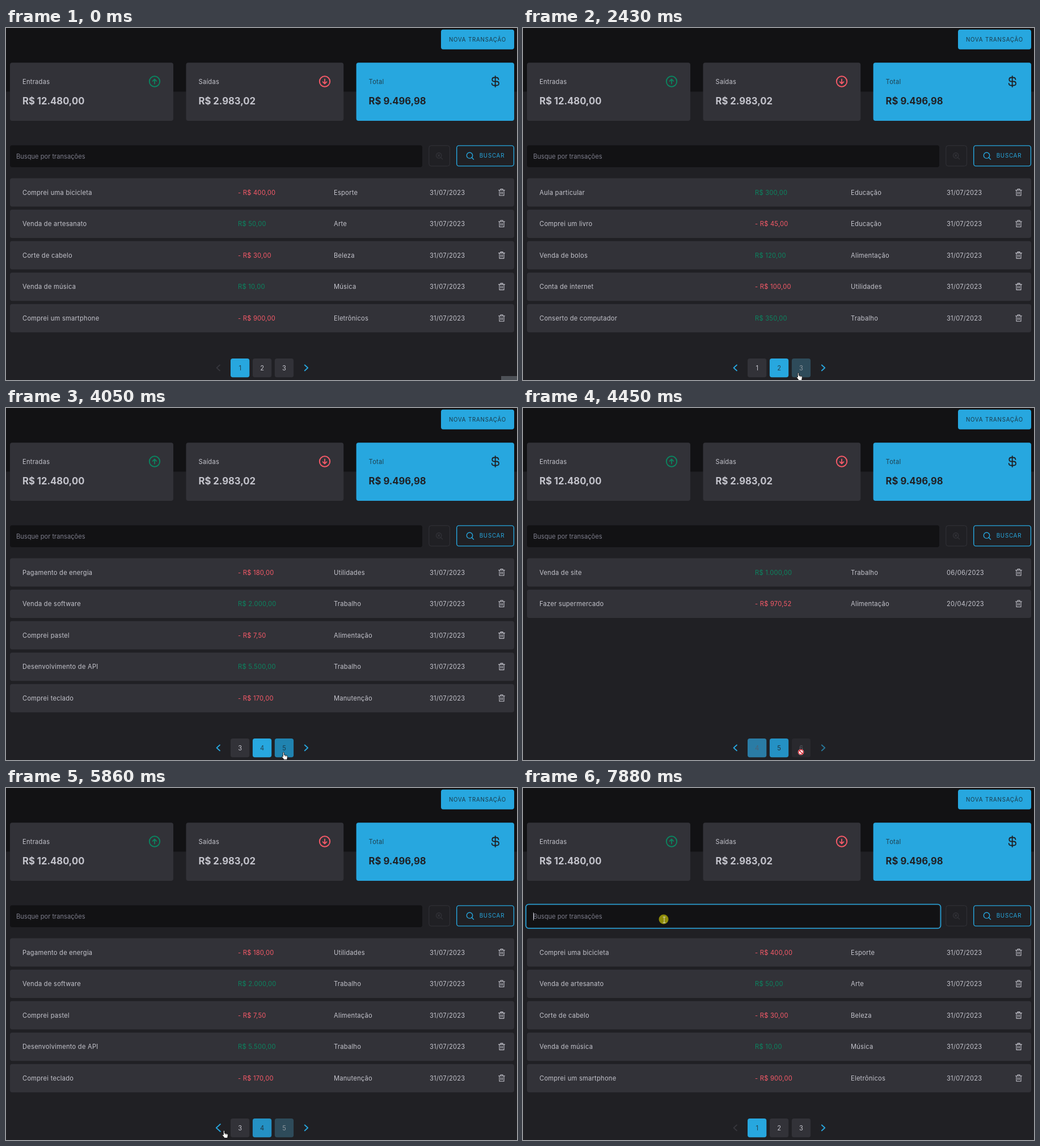
An HTML page for the animation above (8000 ms loop, 901x622 px).

```html
<!DOCTYPE html>
<html lang="pt-BR">
<head>
<meta charset="utf-8">
<title>Transações</title>
<style>
html, body { margin: 0; width: 100%; height: 100%; overflow: hidden; background: #202024; }
svg { display: block; }
text { font: 11.11px Inter, sans-serif; letter-spacing: .26px; fill: #c4c4cc; white-space: pre; }
.sum { font-size: 16.67px; font-weight: 700; letter-spacing: 0; }
.caps { font-size: 9.72px; letter-spacing: .8px; }
.line { fill: none; stroke-linecap: round; stroke-linejoin: round; }
</style>
</head>
<body>
<svg width="901" height="622" viewBox="0 0 901 622">
  <g id="base"></g>
  <g id="live"></g>
</svg>
<script>
const BLUE = '#27a7df', CARD = '#323238', DARK = '#121214', BODY = '#202024';
const GREEN = '#0b8560', RED = '#f75a68', OFF = '#36363c';

const box = (x, y, w, h, fill, r = 4, extra = '') =>
  `<rect x="${x}" y="${y}" width="${w}" height="${h}" rx="${r}" fill="${fill}" ${extra}/>`;
const text = (x, y, s, fill = '#c4c4cc', extra = '') =>
  `<text x="${x}" y="${y}" style="fill:${fill}" ${extra}>${s}</text>`;
const line = (d, color, w = 1.5) =>
  `<path class="line" d="${d}" stroke="${color}" stroke-width="${w}"/>`;
const ring = (x, y, r, color, w) =>
  `<circle cx="${x}" cy="${y}" r="${r}" fill="none" stroke="${color}" stroke-width="${w}"/>`;

// Description | amount | category | date (when it differs)
const pages = [
  ['Comprei uma bicicleta|- R$ 400,00|Esporte', 'Venda de artesanato|R$ 50,00|Arte',
   'Corte de cabelo|- R$ 30,00|Beleza', 'Venda de música|R$ 10,00|Música',
   'Comprei um smartphone|- R$ 900,00|Eletrônicos'],
  ['Aula particular|R$ 300,00|Educação', 'Comprei um livro|- R$ 45,00|Educação',
   'Venda de bolos|R$ 120,00|Alimentação', 'Conta de internet|- R$ 100,00|Utilidades',
   'Conserto de computador|R$ 350,00|Trabalho'],
  ['Concerto de violão|- R$ 60,00|Manutenção', 'Venda de e-book|R$ 150,00|Trabalho',
   'Assinatura de serviço online|- R$ 20,00|Entretenimento',
   'Jantar em restaurante|- R$ 100,00|Alimentação', 'Consultoria|R$ 3.000,00|Trabalho'],
  ['Pagamento de energia|- R$ 180,00|Utilidades', 'Venda de software|R$ 2.000,00|Trabalho',
   'Comprei pastel|- R$ 7,50|Alimentação', 'Desenvolvimento de API|R$ 5.500,00|Trabalho',
   'Comprei teclado|- R$ 170,00|Manutenção'],
  ['Venda de site|R$ 1.000,00|Trabalho|06/06/2023',
   'Fazer supermercado|- R$ 970,52|Alimentação|20/04/2023']
];

// Button looks: background, label
const looks = {
  n: [CARD, '#c4c4cc'],        // normal
  a: [BLUE, '#24414f'],        // active
  h: ['#2083b0', '#183d50'],   // hovered
  o: ['#2a7ca5', '#4d6377'],   // leaving active
  s: ['#2491c4', '#20323d'],   // becoming active
  w: ['#2e4b5a', '#8f979e'],   // half hovered
  x: ['#29292e', '#57575f']    // disabled
};

// time, page, looks of the three buttons, cursor, x, y, click
const steps = `0 1 ann tip 0 0
180 1 ann arrow 884 596
390 1 ann arrow 760 470
600 1 ann arrow 612 346
810 1 ann arrow 548 404
1010 1 ann arrow 486 500
1220 1 ann arrow 462 570
1410 1 awn hand 459 606
1610 1 ahn hand 459 612
2010 1 ahn hand 459 612 click
2210 2 osn hand 459 612
2410 2 naw hand 484 609
2620 2 nah hand 488 608
2820 2 nah hand 488 608 click
3020 3 osw hand 488 608
3230 3 nah hand 488 608
3640 3 nah hand 488 608 click
3840 4 osw hand 488 608
4040 4 nah hand 488 608
4250 4 nah hand 488 608 click
4450 5 osx no 490 608
4650 5 nax no 490 608
4850 5 nax no 488 608
5050 5 nax arrow 470 619
5260 5 nax arrow 420 619
5460 5 nax hand 383 605
5660 5 nax hand 383 605 click
5860 4 nsw hand 383 605
6060 4 nan hand 383 605 click
6260 3 nsw hand 383 605 click
6470 2 nsw hand 383 605 click
6670 1 wsn no 383 604
6870 1 ann no 383 604
7070 1 ann no 383 604
7290 1 ann arrow 352 540
7490 1 ann arrow 276 320
7690 1 ann beam 249 233
7880 1 ann beam 249 233 click`.split('\n').map(s => {
  const [t, page, btns, cursor, x, y, click] = s.split(' ');
  return { t: +t, page: +page, btns, cursor, x: +x, y: +y, click };
});

const cursors = {
  arrow: `<path d="M0 0V12L3 9.5L5 14L7 13L5 9H9Z" fill="#fff" stroke="#000" stroke-width=".7"/>`,
  hand: `<path d="M.2 1Q1.4-.4 2.4 1V5L7 6Q8.6 6.4 8.4 8L7.6 13.5H2.4L-1.6 8.5Q-1.6 6.6.4 8Z"
    fill="#fff" stroke="#000" stroke-width=".8"/><path d="M4.3 6V8M6.2 6.4V8.2" stroke="#000" stroke-width=".6"/>`,
  no: `<circle r="5.3" fill="#fff"/>${ring(0, 0, 4.3, '#d4202c', 1.5)}${line('M-3-3L3 3', '#d4202c', 1.6)}`,
  beam: line('M-2-5H2M0-5V5M-2 5H2', '#d8d8c0', 1)
};

function trash(y) {
  return line(`M868.5 ${y - 4}H879.5M870 ${y - 4}V${y + 5.5}H878V${y - 4}` +
    `M872 ${y - 4}V${y - 6}H876V${y - 4}M872.7 ${y - 1}V${y + 2.7}M875.3 ${y - 1}V${y + 2.7}`, '#c4c4cc', 1.1);
}

function row(data, i) {
  const [name, amount, kind, date = '31/07/2023'] = data.split('|');
  const y = 265.5 + i * 55.55, base = y + 29.2;
  return box(7, y, 889, 50, CARD) + text(29, base, name) +
    text(409, base, amount, amount[0] === '-' ? RED : GREEN) +
    text(578, base, kind) + text(747, base, date) + trash(y + 25);
}

function pager({ page, btns, cursor, x, t }) {
  const first = Math.max(1, page - 1);
  const k = cursor !== 'arrow' && x < 390 && x > 370 ? 1.3 : 1;
  const right = page < 5 ? BLUE : t === 4450 ? '#27789b' : OFF;
  const left = page > 1 || t === 6670 ? BLUE : OFF;
  return line(`M${374 + 3 * k} ${600.5 - 5 * k}l${-5.5 * k} ${5 * k}l${5.5 * k} ${5 * k}`, left, 1.8) +
    line('M526.7 595.5l5.5 5l-5.5 5', right, 1.8) +
    [...btns].map((c, i) => {
      const [bg, ink] = looks[c], bx = 396 + 38.9 * i;
      return box(bx, 584, 33.3, 33.3, bg) +
        text(bx + 16.8, 604.7, first + i, ink, 'text-anchor="middle"');
    }).join('');
}

function pointer({ cursor, x, y, click }) {
  if (cursor === 'tip') return box(873, 615, 28, 7, '#4d5157', 0);
  const halo = click ? `<circle cx="${x - 1}" cy="${y - 1}" r="8.5" fill="#8f8c08"/>` : '';
  return `${halo}<g transform="translate(${x} ${y})">${cursors[cursor]}</g>`;
}

const focus = () => box(5, 205.5, 731.5, 42.5, 'none', 5, `stroke="${BLUE}" stroke-width="1.6"`) +
  line('M18.5 220.5V233.5', '#c4c4cc', 1);

const card = (x, w, label, sum, fill = CARD, ink = '#c4c4cc', title = ink) =>
  box(x, 61.3, w, 102.7, fill) + text(x + 22, 98.8, label, title) +
  text(x + 22, 134.6, sum, ink, 'class="sum"');

const badge = (x, color, s) => ring(x, 94.5, 9.2, color, 1.9) +
  line(`M${x} ${94.5 + 4 * s}v${-8 * s}m-3.4 ${3.4 * s}l3.4 ${-3.4 * s}l3.4 ${3.4 * s}`, color, 1.8);

document.getElementById('base').innerHTML =
  box(0, 0, 901, 622, BODY, 0) + box(0, 0, 901, 112.5, DARK, 0) +
  box(767, 2.7, 129, 35, BLUE) + text(781, 23.8, 'NOVA TRANSAÇÃO', '#1b3a48', 'class="caps"') +
  card(7, 288, 'Entradas', 'R$ 12.480,00') + badge(262, GREEN, 1) +
  card(317.5, 277.7, 'Saídas', 'R$ 2.983,02') + badge(562, RED, -1) +
  card(617.6, 278.4, 'Total', 'R$ 9.496,98', BLUE, BODY, '#20414f') +
  line('M862.7 85V104M868.5 91Q868 87.5 864.5 87.5H861Q857.3 87.5 857.3 91T861 94.5H865Q869 94.5 869 98T865 101.5H860.5Q857 101.5 856.7 98',
    BODY, 1.8) +
  box(7, 207.3, 727, 38.7, DARK) +
  text(18, 230.9, 'Busque por transações', '#7c7c8a', 'letter-spacing="0" class="hint"') +
  box(745.8, 207.8, 36.6, 36.2, 'none', 4, 'stroke="#323238"') +
  ring(763.2, 225.3, 4.7, OFF, 1.1) + line('M766.7 228.8l3 3M761.6 223.7l3.2 3.2m0-3.2l-3.2 3.2', OFF, 1.1) +
  box(794.7, 207.9, 100.7, 36, 'none', 4, `stroke="${BLUE}" stroke-width="1.4"`) +
  ring(817.5, 225.2, 5.2, BLUE, 1.4) + line('M821.3 229l3.2 3.2', BLUE, 1.4) +
  text(834.7, 229.4, 'BUSCAR', BLUE, 'class="caps"');
document.querySelector('.hint').style.letterSpacing = 0;

const live = document.getElementById('live');
let shown;
function draw() {
  const now = performance.now() % 8000;
  const step = steps.findLast(s => s.t <= now);
  if (step !== shown) {
    shown = step;
    live.innerHTML = pages[step.page - 1].map(row).join('') + pager(step) +
      (step.t === 7880 ? focus() : '') + pointer(step);
  }
  requestAnimationFrame(draw);
}
draw();
</script>
</body>
</html>
```
